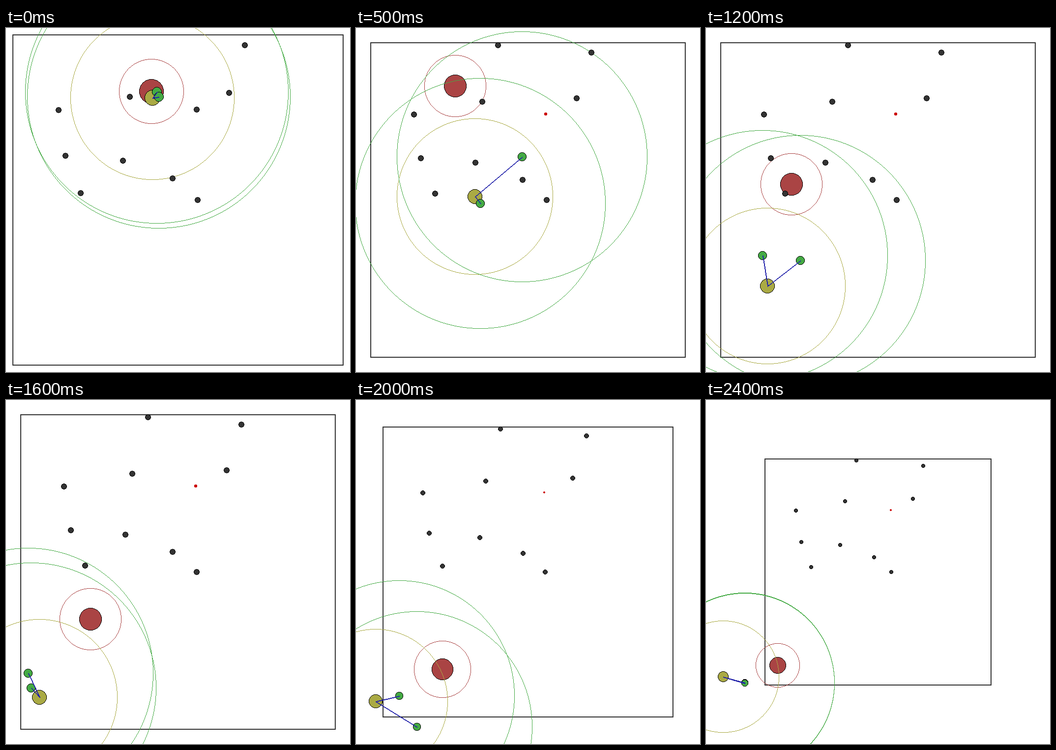
Animation of 700x700 px, one loop 2.5 s. Source, as an HTML page with a canvas:

```html
<!DOCTYPE html>
<html>
<head>
<meta charset="utf-8">
<style>
html, body { margin: 0; width: 100%; height: 100%; overflow: hidden; background: #fff; }
canvas { display: block; }
</style>
</head>
<body>
<canvas id="stage" width="700" height="700"></canvas>
<script>
const g = document.getElementById('stage').getContext('2d');
const STEP = 100, STEPS = 25, LEG = 4, EATEN = 3, MID = 350, MARGIN = 35;

// Each agent passes one waypoint every LEG steps
const agent = (color, size, sight, ...path) => ({ color, size, sight, path });
const agents = [
  agent('#a44', 23.45, 63, [298, 140], [214, 106], [184, 195], [174, 318], [172, 446], [161, 565], [66, 615]),
  agent('#aa4', 15.3, 159.2, [300, 152], [256, 322], [194, 384], [125, 525], [68, 605], [13, 636], [-89, 648]),
  agent('#4a4', 9.2, 254.9, [309, 141], [366, 242], [197, 325], [115, 463], [45, 556], [65, 624], [-27, 664]),
  agent('#4a4', 9.2, 254.9, [313, 150], [270, 334], [199, 396], [192, 473], [51, 586], [105, 692], [-27, 666])
];
const food = [
  [479, 50], [257, 150], [449, 143], [118, 176], [132, 265],
  [243, 274], [339, 309], [161, 337], [388, 350]
];
const prey = [386, 175], newFood = [289, 35];

// Smooth curve through the waypoints
function locate({ path }, step) {
  const t = step / LEG, i = Math.min(Math.floor(t), path.length - 2), u = t - i;
  const a = path[i], b = path[i + 1];
  const before = path[i - 1] || a, after = path[i + 2] || b;
  return a.map((p, k) => {
    const m = (b[k] - before[k]) / 2, n = (after[k] - p) / 2, d = b[k] - p;
    return p + u * (m + u * (3 * d - 2 * m - n + u * (m + n - 2 * d)));
  });
}

const halfWidth = (r, i) => Math.round(Math.sqrt(Math.max(0, r * r - i * i)) - 0.5) + 0.5;

function ring([x, y], size, color) {
  const r = size - 0.5;
  g.fillStyle = color;
  for (let i = 0.5; i <= r * 0.71 + 0.5; i++) {
    const j = halfWidth(r, i);
    for (const [p, q] of [[i, j], [j, i]])
      for (const sx of [-1, 1])
        for (const sy of [-1, 1])
          g.fillRect(x + sx * p - 0.5, y + sy * q - 0.5, 1, 1);
  }
}

function disc([x, y], size, color, edge = '#000') {
  const r = size - 0.5;
  g.fillStyle = color;
  for (let j = -r; j <= r; j++) {
    const w = halfWidth(r, j);
    g.fillRect(x - w - 0.5, y + j - 0.5, 2 * w + 1, 1);
  }
  ring([x, y], size, edge);
}

function link([x0, y0], [x1, y1]) {
  const dx = x1 - x0, dy = y1 - y0;
  const n = Math.max(Math.abs(dx), Math.abs(dy), 1);
  const steep = Math.abs(dy) > Math.abs(dx);
  g.fillStyle = '#22a';
  for (let i = 0; i <= n; i++)
    g.fillRect(Math.round(x0 + dx * i / n), Math.round(y0 + dy * i / n), steep ? 2 : 1, steep ? 1 : 2);
}

function draw(step) {
  const eaten = step >= EATEN;
  const dots = [...food, eaten ? newFood : prey];
  const spots = agents.map(a => locate(a, step));

  // The view zooms so that everything keeps the margin from the stage edge
  const reach = Math.max(...[...dots, ...spots].flat().map(c => Math.abs(c - MID)));
  const zoom = (MID - MARGIN) / reach;
  const place = c => Math.floor(MID + (c - MID) * zoom + 1e-6);
  const view = ([x, y]) => [place(x + 0.6), place(y)];
  const scale = r => Math.round(r * zoom);

  g.fillStyle = '#fff';
  g.fillRect(0, 0, 700, 700);
  const half = scale(320);
  g.strokeStyle = '#333';
  g.lineWidth = 2;
  g.strokeRect(MID - half, MID - half, 2 * half, 2 * half);

  const seen = spots.map(view);
  agents.forEach((a, i) => {
    disc(seen[i], scale(a.size), a.color);
    ring(seen[i], scale(a.sight), a.color);
  });
  for (const p of dots) disc(view(p), scale(5.6), '#333');
  if (eaten) disc(view(prey), scale(2.6), '#c00', '#c00');
  link(seen[1], seen[2]);
  link(seen[1], seen[3]);
}

const start = performance.now();
let shown = -1;
function tick() {
  const step = Math.floor((performance.now() - start) / STEP) % STEPS;
  if (step !== shown) draw(shown = step);
  requestAnimationFrame(tick);
}
tick();
</script>
</body>
</html>
```
